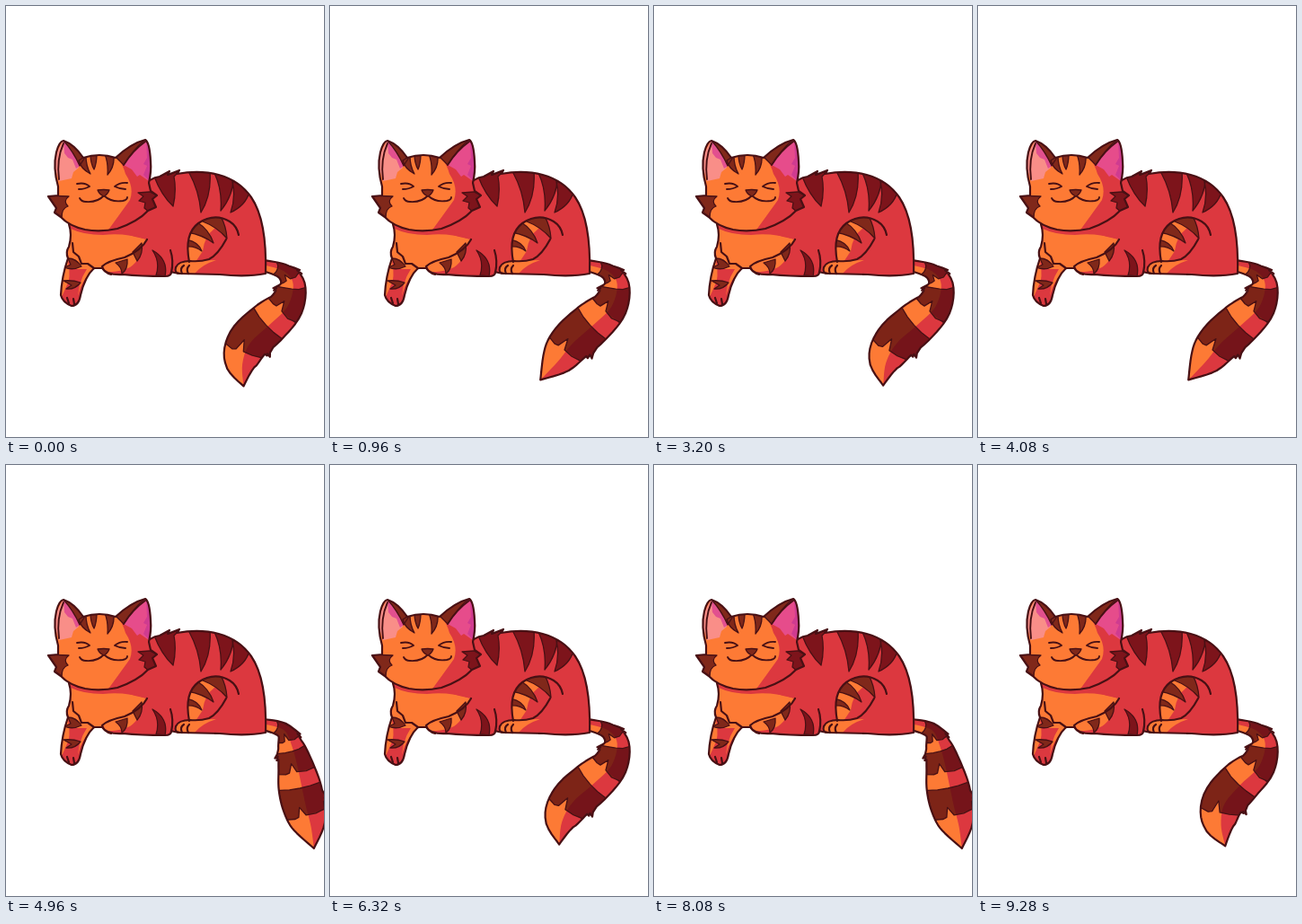
An HTML page that plays this animation: 354 px wide and 480 px high, repeating every 9360 ms.

```html
<!DOCTYPE html>
<html lang="en">
<head>
<meta charset="utf-8">
<title>Cat swinging its tail</title>
<style>
  html, body { margin: 0; width: 100%; height: 100%; overflow: hidden; background: #fff; }
  svg { display: block; width: 354px; height: 480px; }
  path { stroke-linejoin: round; stroke-linecap: round; }
  .orange { fill: #fd7a35; }
  .red { fill: #dc383f; }
  .brown { fill: #7d2417; }
  .deep { fill: #75141a; }
  .line { fill: none; stroke: #481014; stroke-width: 2.2; }
  .stripes { fill: #7d141b; stroke: #481014; stroke-width: 1.3; }
  .warm { fill: #80281a; }
</style>
</head>
<body>
<svg viewBox="0 0 354 480">
  <defs>
    <path id="body" d="M150 204 Q160 191 171 190 L182 184 L180 188 L193 183 L190 187 C222 181 255 187 273 213 C286 232 290 262 289 298 Q268 302 238 299 L194 298 Q186 297 184 296 Q184 301 177 301 Q150 301 130 299 Q112 300 107 292 L98 292 Q88 301 83 322 Q81 334 73 334 Q63 330 61 322 Q62 301 69 281 Q66 274 70 268 Q74 255 70 243 Z"/>
    <path id="head" d="M58 201 Q52 180 56 163 Q59 151 64 150 Q76 154 86 169 Q104 163 122 169 Q139 153 155 149 Q160 152 161 173 Q162 184 159 197 L161 206 L168 211 L163 215 L167 224 L158 228 Q147 240 124 248 Q105 252 88 249 Q70 245 61 235 L54 230 L56 225 L47 212 L58 211 Z"/>
    <path id="thigh" d="M204 285 Q198 254 214 242 Q232 230 249 240 Q257 245 259 255 Q245 260 234 279 L206 285 Z"/>
    <clipPath id="bodyClip"><use href="#body"/></clipPath>
    <clipPath id="headClip"><use href="#head"/></clipPath>
    <clipPath id="thighClip"><use href="#thigh"/></clipPath>
    <clipPath id="tailClip"><path id="tailShape"/></clipPath>
  </defs>

  <g id="tail">
    <g clip-path="url(#tailClip)">
      <path id="tailBase" class="orange"/>
      <path id="tailShade" class="red"/>
      <path id="tailBands" class="brown"/>
      <path id="tailBandShade" class="deep"/>
      <path id="tailBandEdges" class="line" style="stroke-width:1.3"/>
    </g>
    <path id="tailLine" class="line"/>
  </g>

  <use href="#body" class="red"/>
  <g clip-path="url(#bodyClip)">
    <path class="orange" d="M66 236 L115 244 Q130 255 157 260 Q154 271 130 281 L108 291 L98 292 Q84 306 80 322 L70 306 L62 324 L58 300 Z"/>
    <path class="orange" d="M107 288 L134 280 Q147 274 150 267 Q151 282 138 291 Q126 297 111 296 Z"/>
    <path class="red" d="M69 284 L79 293 L90 293 Q79 309 80 332 L70 331 L67 316 Q73 302 69 284 Z"/>
    <path class="red" d="M70 242 L126 244 L157 260 Q131 252 108 255 Q86 255 72 248 Z"/>
    <path class="stripes" d="M165 190 L183 183 L181 188 L194 183 L187 190 Q190 206 186 223 Q173 211 165 190 Z M204 184 L227 184 Q229 211 217 230 Q215 206 204 186 Z M232 184 L253 188 Q254 210 239 228 Q241 205 232 186 Z M252 189 L271 207 Q267 222 250 230 Q256 213 252 196 Z M163 272 Q181 282 177 301 L167 300 Q172 285 163 272 Z"/>
    <path class="stripes warm" d="M141 274 L151 264 Q153 276 146 284 Z M122 286 L135 282 Q136 293 129 298 Q129 291 122 286 Z M69 281 Q78 281 84 290 Q74 295 65 291 L72 288 Z M64 306 Q74 305 83 308 Q77 316 67 315 L73 311 Z"/>
  </g>
  <use href="#thigh" class="red"/>
  <g clip-path="url(#thighClip)">
    <path class="orange" d="M196 240 L236 230 Q241 239 232 248 Q221 256 219 273 L209 288 H196 Z"/>
    <path class="stripes warm" d="M219 238 L237 231 Q245 243 246 259 Q235 246 219 240 Z M202 252 L213 241 Q226 249 231 264 Q219 255 202 252 Z M200 260 Q214 262 218 273 Q210 267 201 268 Z"/>
  </g>
  <path class="orange" d="M205 284 Q192 284 189 291 Q187 298 194 298 L210 298 Q218 288 234 283 Z"/>
  <use href="#body" class="line"/>
  <path class="line" d="M204 285 Q198 254 214 242 Q232 230 249 240 Q257 245 259 255 M245 260 Q236 277 226 282 Q216 285 205 284 Q192 284 189 291 Q187 298 194 298 M198 289 Q193 292 196 298 M204 289 Q200 293 203 298
    M157 260 Q151 272 132 280 Q113 284 107 290 M107 290 Q109 297 117 299 M183 272 Q187 284 184 297 M74 264 L75 274 L81 279 L84 287 L91 287 L98 292 M68 325 L70 331 M75 326 L76 332"/>

  <use href="#head" class="orange"/>
  <g clip-path="url(#headClip)">
    <path class="red" d="M123 167 Q130 176 133 187 Q143 202 138 216 Q128 230 112 252 L172 252 V195 L155 150 Z"/>
    <path fill="#f98e88" d="M59 195 L52 172 L64 149 Q75 164 81 180 L75 185 L73 192 Z"/>
    <path fill="#e2508f" d="M64 150 L84 177 L78 181 L74 171 L69 169 L65 164 Z"/>
    <path fill="#e64c8b" d="M131 177 Q141 161 156 148 L163 171 L159 195 L149 188 L146 190 L140 182 Z"/>
    <path fill="#cf3b90" d="M156 149 L163 172 L160 195 L153 188 L157 178 L153 176 L157 169 Z"/>
    <path class="stripes warm" d="M64 150 Q78 154 87 170 L82 178 Q75 162 64 150 Z M122 168 Q138 154 156 148 Q142 159 131 177 Z
      M81 172 L89 167 Q89 178 94 187 Q83 181 81 172 Z M94 165 L101 165 Q101 175 98 182 Q94 175 94 165 Z M110 165 L120 167 Q121 179 113 188 Q114 175 110 165 Z
      M46 211 L70 212 Q63 217 69 223 Q62 225 62 236 L48 228 Z"/>
    <path class="stripes" d="M169 211 L160 207 L147 208 L153 212 L148 217 L155 219 L154 225 L160 230 L170 225 Z"/>
  </g>
  <use href="#head" class="line"/>
  <path class="line" style="stroke-width:1.9" d="M59 193 Q56 171 64 153 M131 177 Q141 161 155 151 M79 198 Q88 196 93 201 Q88 204 81 204 M135 197 Q127 196 121 201 Q127 204 133 204 M82 214 Q84 218 89 218 Q102 219 109 211 Q117 219 130 217 Q135 216 135 213"/>
  <path class="stripes warm" d="M102 205 Q109 204 115 205 Q113 210 109 212 Q104 210 102 205 Z"/>
</svg>

<script>
const PERIOD = 3120;      // one swing left, right and back
const TICK = 40;
const ROOT = [[287, 289], [309, 296]];

// Joint angles are degrees from straight down, positive to the right.
const LEFT = { angle: [33, -16, -46, -48, -38, -40], length: [17, 25, 28, 31, 26, 28] };
const RIGHT = { angle: [24, 14, 11, 12, 17, 20], length: [20, 22, 23, 23, 23, 24] };
const HALF_WIDTH = [6, 8.5, 14.5, 19.5, 23.5, 23, 17.5, 0];
const BANDS = [[-.4, .6], [1.15, 2.25], [3, 4.4]];

const byId = id => document.getElementById(id);
const mix = (a, b, k) => a + (b - a) * k;
const smooth = u => { u = Math.min(1, Math.max(0, u)); return u * u * (3 - 2 * u); };
const polyline = points => 'M' + points.map(p => p.map(v => v.toFixed(2)).join(' ')).join('L');

// 0 = joint fully left, 1 = fully right; joints nearer the tip follow later.
function rightness(t, joint) {
  const toRight = smooth((t - 1520 - 40 * joint) / 300 + .5);
  const toLeft = time => smooth((time - 2110 - 190 * joint) / 640 + .5);
  return toRight - toLeft(t) + 1 - toLeft(t + PERIOD);
}

function tailJoints(t) {
  const joints = ROOT.slice();
  for (let i = 0; i < 6; i++) {
    const k = rightness(t, i + 1);
    const angle = mix(LEFT.angle[i], RIGHT.angle[i], k) * Math.PI / 180;
    const length = mix(LEFT.length[i], RIGHT.length[i], k);
    const [x, y] = joints[joints.length - 1];
    joints.push([x + length * Math.sin(angle), y + length * Math.cos(angle)]);
  }
  return joints;
}

// Catmull-Rom; s = 0 is the second value.
function spline(values, s) {
  const last = values.length - 1;
  const i = Math.min(last - 1, Math.max(0, Math.floor(s + 1)));
  const u = s + 1 - i;
  const [a, b, c, d] = [i - 1, i, i + 1, i + 2].map(n => values[Math.min(last, Math.max(0, n))]);
  return b + u * (c - a + u * (2 * a - 5 * b + 4 * c - d + u * (3 * (b - c) + d - a))) / 2;
}

function drawTail(t) {
  const joints = tailJoints(t);
  const xs = joints.map(p => p[0]), ys = joints.map(p => p[1]);

  // Position along the tail (s) and across it (-1 left edge, 1 right edge).
  const at = (s, across) => {
    const x = spline(xs, s), y = spline(ys, s);
    const dx = spline(xs, s + .02) - spline(xs, s - .02);
    const dy = spline(ys, s + .02) - spline(ys, s - .02);
    const reach = across * Math.max(0, spline(HALF_WIDTH, s)) / (Math.hypot(dx, dy) || 1);
    return [x + dy * reach, y - dx * reach];
  };
  const side = (across, from = -1, to = 6) => {
    const points = [], count = Math.ceil((to - from) * 6);
    for (let i = 0; i <= count; i++) points.push(at(mix(from, to, i / count), across));
    return points;
  };
  const tuft = (s, across) => [[.25, 1.1], [.45, 1.25], [.4, 1.05], [.6, 1.12], [.58, 1]]
    .map(([shift, reach]) => at(s + shift, across * reach));
  const leftSide = [...side(-1, -1, .9), ...tuft(.9, -1), ...side(-1, 1.5, 6)];
  const rightSide = [
    ...side(1, -1, .05), ...tuft(.05, 1),
    ...side(1, .65, 3.4), ...tuft(3.4, 1), ...side(1, 4, 6)
  ];
  const outline = polyline([...leftSide, ...rightSide.reverse()]);

  const upperEdge = s => [-1.4, -.5, 0, .5, 1.4].map(across => at(s + .08 * (1 - across * across), across));
  const lowerEdge = s => [[-1.4, -.1], [-.6, .06], [-.4, .02], [-.22, -.42], [0, .02], [.5, .06], [1.4, -.1]]
    .map(([across, shift]) => at(s + shift, across));
  const bands = BANDS.map(([from, to]) => polyline([...upperEdge(from), ...lowerEdge(to).reverse()]) + 'Z');
  const bandShade = BANDS.map(([from, to]) =>
    polyline([...side(.1, from + .08, to + .02), ...side(1.4, from, to).reverse()]) + 'Z');

  const set = (id, d) => byId(id).setAttribute('d', d);
  for (const id of ['tailShape', 'tailBase', 'tailLine']) set(id, outline);
  set('tailShade', polyline([...side(.1), ...side(1.4).reverse()]) + 'Z');
  set('tailBands', bands.join(''));
  set('tailBandShade', bandShade.join(''));
  set('tailBandEdges', bands.join(''));
}

const start = performance.now();
function frame() {
  const elapsed = performance.now() - start;
  drawTail(Math.floor(elapsed / TICK) * TICK % PERIOD);
  requestAnimationFrame(frame);
}
frame();
</script>
</body>
</html>
```
